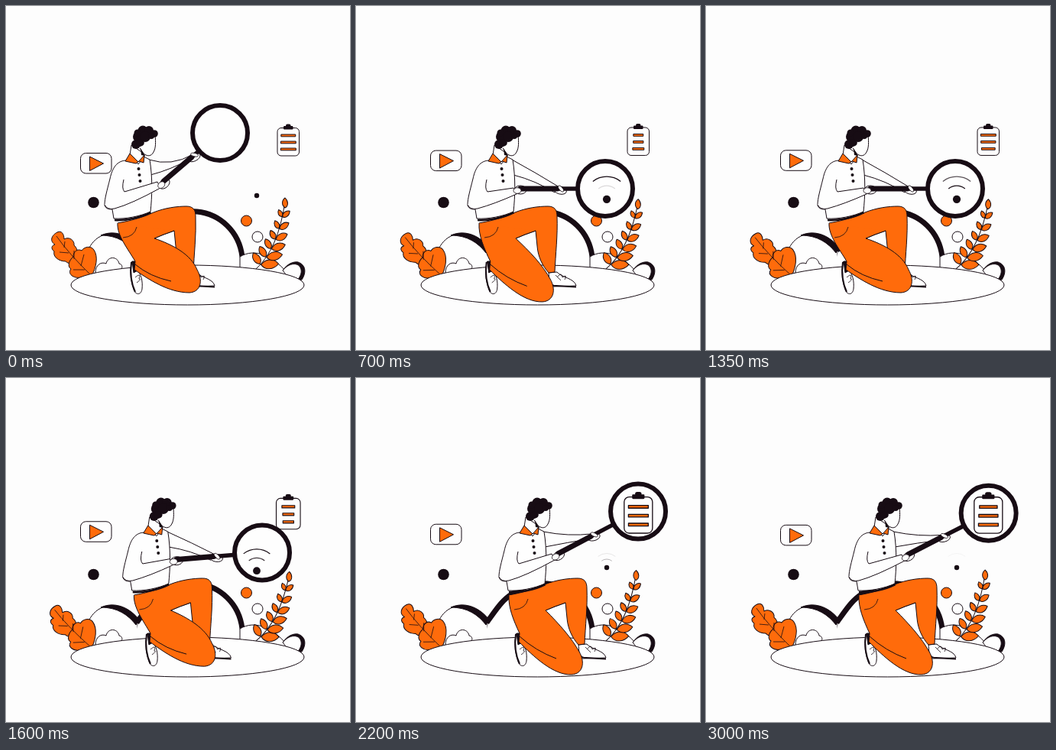
An HTML page with a canvas that plays this animation: 450 by 450 pixels, repeating every 3050 ms.

```html
<!DOCTYPE html>
<html lang="en">
<head>
<meta charset="utf-8">
<title>Searching with a magnifier</title>
<style>
html, body { margin: 0; width: 100%; height: 100%; overflow: hidden; background: #fdfdfd; }
canvas { display: block; width: 450px; height: 450px; }
</style>
</head>
<body>
<canvas id="stage" width="450" height="450"></canvas>
<script>
const ctx = document.getElementById('stage').getContext('2d');
const LOOP = 3050, BEAT = LOOP / 3;
const INK = '#170c14', ORANGE = '#ff6b0b', WHITE = '#fefefe';

// time, torso x, hip x, grip x, grip y, handle length, handle angle, tucked knee
const POSES = [
  [0, -58, -54, 204, 231, 100, -.707, 1],
  [150, -58, -54, 204, 231, 100, -.707, 1],
  [700, -41, -39, 212, 239, 114, 0, .08],
  [1300, -41, -39, 212, 239, 114, 0, 1],
  [1400, -41, -39, 212, 239, 114, 0, 1],
  [2180, 0, 0, 262, 231, 121, -.485, 0],
  [2250, 0, 0, 262, 231, 121, -.485, 0],
  [2600, 1, 0, 262, 232, 121, -.427, 0],
  [3000, 0, 0, 262, 232, 121, -.474, 0],
  [LOOP, 0, 0, 262, 232, 121, -.474, 0]
];

const clamp = v => Math.max(0, Math.min(1, v));
const smooth = v => { v = clamp(v); return v * v * (3 - 2 * v); };
const ramp = (t, a, b) => smooth((t - a) / (b - a));

function poseAt(t) {
  const i = POSES.findIndex(p => p[0] > t);
  const a = POSES[i - 1], b = POSES[i], k = ramp(t, a[0], b[0]);
  return a.slice(1).map((v, j) => v + (b[j + 1] - v) * k);
}

function shape(d, fill, stroke = INK, width = 1) {
  const path = new Path2D(d);
  if (fill) { ctx.fillStyle = fill; ctx.fill(path); }
  if (stroke) { ctx.strokeStyle = stroke; ctx.lineWidth = width; ctx.stroke(path); }
}

function oval(x, y, rx, ry, fill, stroke = INK, width = 1, angle = 0) {
  ctx.beginPath();
  ctx.ellipse(x, y, rx, ry, angle, 0, 7);
  if (fill) { ctx.fillStyle = fill; ctx.fill(); }
  if (stroke) { ctx.strokeStyle = stroke; ctx.lineWidth = width; ctx.stroke(); }
}
const disc = (x, y, r, fill, stroke) => oval(x, y, r, r, fill, stroke);

function box(x, y, w, h, r, fill, stroke = INK) {
  ctx.beginPath();
  ctx.roundRect(x, y, w, h, r);
  ctx.fillStyle = fill;
  ctx.fill();
  if (stroke) { ctx.strokeStyle = stroke; ctx.lineWidth = 1; ctx.stroke(); }
}

// Draws around a pivot that is moved, turned and scaled.
function around(x, y, { dx = 0, dy = 0, turn = 0, scale = 1 }, draw) {
  ctx.save();
  ctx.translate(x + dx, y + dy);
  ctx.rotate(turn);
  ctx.scale(scale, scale);
  ctx.translate(-x, -y);
  draw();
  ctx.restore();
}

function hills() {
  shape('M104 345 C102 315 118 299 136 298 C154 297 166 308 172 320 L172 345', WHITE);
  shape('M124 300 C145 291 164 303 174 316 L170 323 C160 310 146 300 124 300Z', INK);
  shape('M169 345 C172 250 305 235 309 345Z', WHITE, null);
  shape('M171 320 C182 305 191 290 205 282 C222 270 240 268 250 269 C280 272 305 295 309 328', null, INK, 7);
  shape('M306 345 L306 328 C326 316 350 326 372 354', WHITE);
  shape('M362 346 C368 337 376 334 382 335 C391 338 394 347 387 358 L379 359Z', INK);
  shape('M362 346 C371 335 382 336 385 342 C388 348 385 354 381 359 L370 356Z', WHITE);
  shape('M117 349 C117 339 124 334 131 337 C133 327 146 327 148 337 C153 338 152 343 151 344', WHITE);
}

function lobedPlant(sway) {
  around(112, 352, { turn: -.05 * sway }, () => {
    shape('M67 296 C73 293 76 299 76 305 C83 301 90 307 89 313 C95 318 96 329 88 336 ' +
      'C84 338 80 336 78 334 C69 334 61 328 63 321 C58 317 60 313 64 312 C57 308 59 300 67 296Z', ORANGE);
    shape('M112 353 C118 342 121 328 115 319 C111 313 102 315 99 320 C94 317 88 321 88 328 ' +
      'C82 333 80 341 85 344 C80 350 88 357 98 355 C104 356 109 355 112 353Z', ORANGE);
    shape('M66 301 Q82 324 112 353 M76 316 L77 308 M82 323 L70 322 M89 331 L89 320 M98 340 L102 325 M103 345 L88 345', null, INK, .8);
  });
}

function leaf(x, y, size, angle) {
  ctx.save();
  ctx.translate(x, y);
  ctx.rotate(angle);
  const w = size * .33;
  shape(`M1 0 C${size * .3} ${-w} ${size * .75} ${-w} ${size} 0 C${size * .7} ${w} ${size * .25} ${w} 1 0Z`, ORANGE);
  ctx.restore();
}

function fern(sway) {
  around(330, 345, { turn: .065 * sway }, () => {
    shape('M327 344 Q356 318 365 256', null);
    for (let i = 0; i < 6; i++) {
      const u = .1 + i * .145, v = 1 - u;
      const x = v * v * 327 + 2 * u * v * 356 + u * u * 365;
      const y = v * v * 344 + 2 * u * v * 318 + u * u * 256;
      leaf(x, y, 18 - i * 1.4, -2.1 + i * .02);
      leaf(x, y, 24 - i * 2.2, -.05 - i * .13);
    }
    leaf(365, 265, 14, -1.57);
  });
}

function videoCard(sway) {
  around(117, 206, { dy: -5 * sway }, () => {
    box(97.5, 192.5, 40.5, 26.5, 7, WHITE);
    shape('M109.5 197 L127.5 206 L109.5 215.5Z', ORANGE);
  });
}

function wifi(beat, scale) {
  around(328, 240, { scale }, () => {
    disc(328, 248, 3.2, INK, null);
    const inner = ramp(beat, 60, 320) * (1 - ramp(beat, 520, 760));
    const outer = ramp(beat, 80, 480) * (1 - ramp(beat, 700, 1010));
    [[11, inner], [18.5, outer]].forEach(([r, alpha]) => {
      ctx.globalAlpha = alpha;
      ctx.beginPath();
      ctx.arc(328, 248, r, -2.23, -.91);
      ctx.strokeStyle = INK;
      ctx.lineWidth = .8;
      ctx.stroke();
    });
    ctx.globalAlpha = 1;
  });
}

function clipboard(t, scale, sway) {
  around(369, 172, { scale, dy: -.8 * sway }, () => {
    box(355, 159.5, 28.5, 36.5, 5, WHITE);
    box(363, 157, 12.5, 4.5, 1, INK, null);
    box(366, 154.5, 6.5, 4, 2, INK, null);
    for (let i = 0; i < 3; i++) {
      const dip = .5 - .5 * Math.cos((t - 60 - (2 - i) * 80) / BEAT * 2 * Math.PI);
      const w = 20 * (1 - .36 * dip ** 2);
      box(369.3 - w / 2, 168 + i * 9, w, 2.8, 0, ORANGE);
    }
  });
}

function legs(s) {
  const kx = 12 * s, ky = -13 * s, f = 9 * s;
  // front shoe and leg
  shape('M291 349 L302 348 C307 355 325 356 327 366 L296 367 C291 364 292 356 291 349Z', WHITE);
  shape('M292 362 Q295 366 301 366 L327 367.5', null, INK, 2);
  shape('M302 355 Q308 347 309 355 Q316 350 312 358 M300 352 L307 359', null, INK, .8);
  shape('M200 284 C216 281 232 277 247 270 C262 264 278 262 290 262 C299 262 302 267 302 275 ' +
    'C303 300 300 325 299 348 L291 349 C283 340 277 328 276 314 L274 294 Q259 299 248 304', ORANGE);
  // kneeling shoe and leg
  around(0, 0, { dx: f }, () => {
    shape('M210 334 C206 345 208 360 212 371 C215 379 222 378 223 370 C224 360 222 351 216 344Z', WHITE);
    shape('M209 335 C207 350 209 363 214 374', null, INK, 2);
    shape('M210 334 L215 334 L217 346 L212 349Z', INK);
    shape('M214 355 Q222 348 219 357 Q223 357 216 362', null, INK, .8);
  });
  shape(`M200 284 C199 300 ${206 + 7 * s} 317 ${214 + f} 334 L${213 + f} 345 ` +
    `C${232 + 8 * s} ${364 - 7 * s} ${258 + 8 * s} ${389 - 14 * s} ${282 + kx} ${388 + ky} ` +
    `C${297 + kx} ${387 + ky} ${300 + kx} ${372 + ky} ${292 + kx} ${358 + ky} ` +
    `C${282 + 14 * s} ${340 - 15 * s} ${266 + 6 * s} ${322 - 10 * s} 248 304 Q259 299 274 294`, ORANGE);
  shape(`M${214 + f} 338 Q${235 + 7 * s} ${357 - 3 * s} ${262 + 8 * s} ${367 - 7 * s}`, null);
  shape('M207 303 Q222 302 225 289', null, INK, .8);
}

function head() {
  shape('M222 182 L220 195 L231 207 L239 197 L237 192Z', WHITE);
  shape('M234 172 L253 169 C254 178 254 186 251 191 C248 197 243 197 238 193 L233 186', WHITE);
  shape('M234 186 L240 196 L235 195Z', INK, null);
  [[228, 181, 6], [231, 171, 7], [237, 163, 6.5], [245, 163, 6], [252, 167, 4.8],
    [240, 171, 7], [233, 179, 5], [248, 170, 4], [230, 166, 4.5]].forEach(c => disc(...c, INK, null));
  shape('M237 176 Q239 180 236 182', null, INK, 2);
}

function torso() {
  shape('M216 202 C203 202 197 212 194 226 C190 242 187 252 187 260 C188 266 194 266 197 266 ' +
    'L199 278 C214 279 234 275 247 269 C249 250 250 225 246 201 L238 197Z', WHITE);
  shape('M200 280 C214 281 234 277 247.5 270', null, INK, 2.6);
  head();
  shape('M220 193 L214 203 L228 206 L232 203 L238 205 L239 195 L231 204Z', ORANGE);
  [[231.5, 213], [232.5, 221], [233.5, 229]].forEach(([x, y]) => disc(x, y, 2, INK, null));
}

function farArm(dx, hx, hy) {
  const x = 245 + dx, sag = Math.max(0, 70 - Math.hypot(hx - x, hy - 202)) * 1.2;
  shape(`M${x} 201 Q${(x + hx) / 2} ${(201 + hy) / 2 + sag - 2} ${hx} ${hy - 2} L${hx - 6} ${hy + 5} ` +
    `Q${(x + hx) / 2} ${(218 + hy) / 2 + sag * .5} ${x + 2} 221`, WHITE);
}

function nearArm(dx, gx, gy) {
  shape(`M${212 + dx} 227 Q${209 + dx} 239 ${213 + dx} 243 L${gx - 6} ${gy - 1} L${gx - 2} ${gy + 7} ` +
    `Q${222 + dx} 259 ${200 + dx} 265 Q${190 + dx} 267 ${187 + dx} 260`, WHITE);
}

function line(x1, y1, x2, y2, width) {
  shape(`M${x1} ${y1} L${x2} ${y2}`, null, INK, width);
}

function draw(t) {
  const [dx, hip, gx, gy, len, angle, tuck] = poseAt(t);
  const sway = .5 - .5 * Math.cos(t / BEAT * 2 * Math.PI);
  const c = Math.cos(angle), s = Math.sin(angle);
  const along = d => [gx + c * d, gy + s * d];
  const lens = along(len), hand = along(54);

  ctx.fillStyle = '#fdfdfd';
  ctx.fillRect(0, 0, 450, 450);
  ctx.lineJoin = 'round';

  hills();
  lobedPlant(sway);
  fern(sway);
  oval(237.5, 365, 152.5, 26, WHITE);
  videoCard(sway);
  disc(114.5, 257, 7.3, INK, null);
  disc(314.5, 281, 7, ORANGE);
  disc(329, 302, 7, WHITE);

  disc(...lens, 36, WHITE, null);
  wifi(t % BEAT, 1 + .6 * ramp(t, 200, 700) * (1 - ramp(t, 1450, 2150)));
  clipboard(t, 1 + .3 * ramp(t, 1400, 1900), sway);
  oval(...lens, 36, 36, null, INK, 6);

  around(0, 0, { dx: hip }, () => legs(tuck));
  farArm(dx, ...hand);
  around(0, 0, { dx }, torso);

  oval(hand[0] + 1, hand[1] + 2, 8.5, 5, WHITE, INK, 1, angle + .25);
  oval(gx + 3, gy + 1.5, 8, 5.5, WHITE, INK, 1, angle);
  line(...along(50), ...along(len - 35), 5.5);
  ctx.lineCap = 'round';
  line(...along(3), ...along(51), 7);
  ctx.lineCap = 'butt';
  const thumb = along(56), finger = along(-1);
  oval(thumb[0], thumb[1], 5, 2.2, WHITE, INK, .8, angle + .9);
  nearArm(dx, gx, gy);
  oval(finger[0], finger[1] + 2.5, 5, 3.8, WHITE, INK, .8, angle);
}

const start = performance.now();
function tick() {
  draw((performance.now() - start) % LOOP);
  requestAnimationFrame(tick);
}
tick();
</script>
</body>
</html>
```
